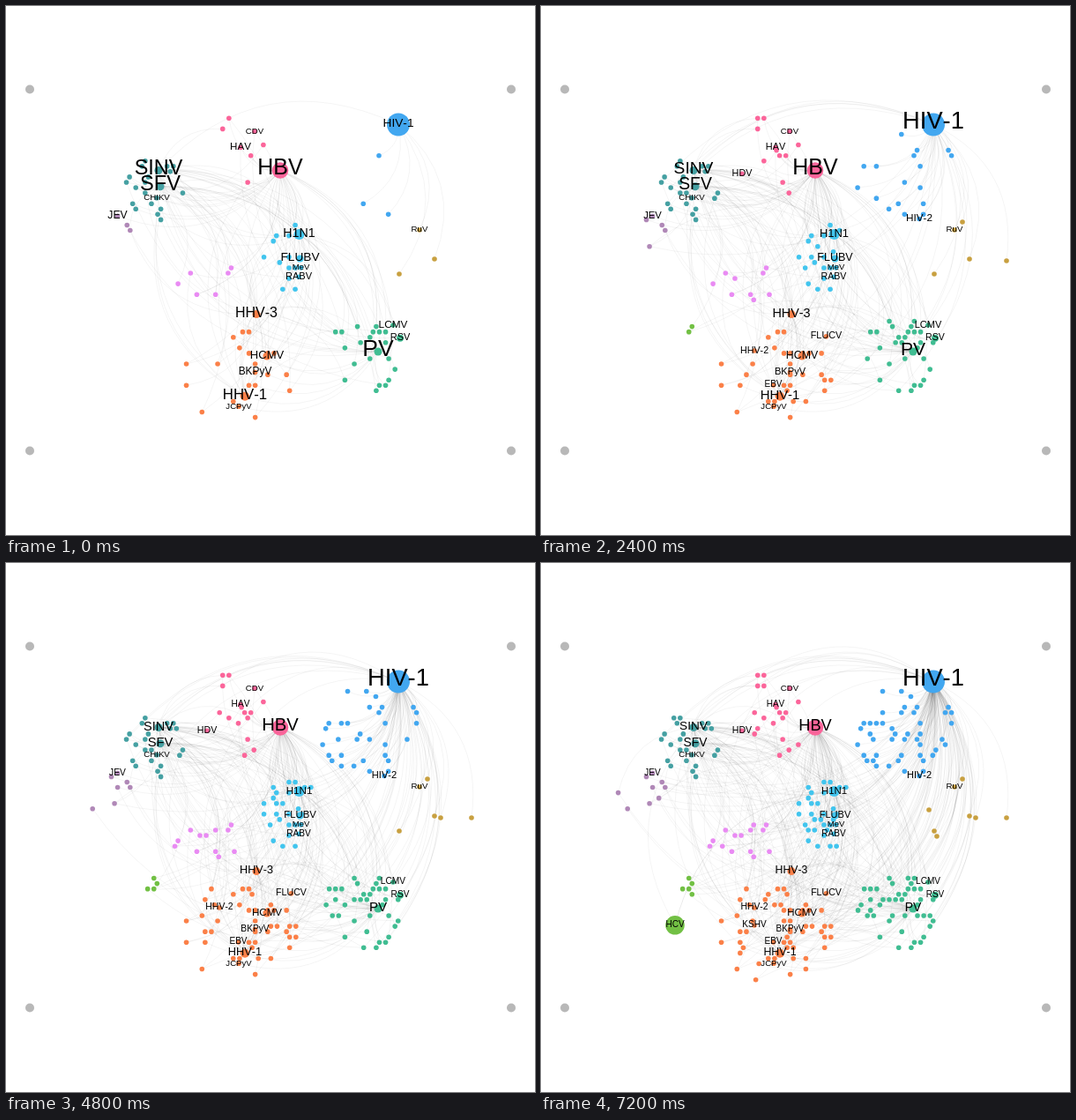
An HTML page with a canvas that plays this animation: 600x600 px, repeating every 8000 ms.

```html
<!DOCTYPE html>
<html lang="en">
<head>
<meta charset="utf-8">
<title>Virus network</title>
<style>
  html, body { margin: 0; width: 100%; height: 100%; overflow: hidden; background: #fff; }
  canvas { display: block; width: 600px; height: 600px; }
</style>
</head>
<body>
<canvas id="stage" width="600" height="600"></canvas>
<script>
const STEP = 800, STEPS = 10, LAST = STEPS - 1;
const ctx = document.getElementById('stage').getContext('2d');
const dots = [], labels = [], links = [];

const BLUE = '#42a7f0', PINK = '#fb659a', TEAL = '#45a0a2', PURPLE = '#b088b7',
      VIOLET = '#e98bf3', SKY = '#42c5ee', MINT = '#40bd92', ORANGE = '#fb8048',
      GOLD = '#c8a040', GREEN = '#72c044';

let seed = 41;
const rand = () => {
  seed = (seed * 1664525 + 1013904223) % 4294967296;
  return seed / 4294967296;
};
const pick = list => list[Math.floor(rand() * list.length)];

function dot(x, y, color, born = 0, r = 2.8) {
  const d = { x, y, color, born, r };
  dots.push(d);
  return d;
}

// Scatters dots over a hexagonal lattice inside an ellipse; the count grows steadily.
function cluster(color, cx, cy, rx, ry, first, last) {
  const dx = 7.1, dy = 6.06, free = [];
  for (let row = Math.ceil((cy - ry) / dy); row * dy <= cy + ry; row++) {
    const shift = row % 2 ? dx / 2 : 0;
    for (let x = cx - rx + shift; x <= cx + rx; x += dx) {
      const y = row * dy;
      if (((x - cx) / rx) ** 2 + ((y - cy) / ry) ** 2 <= 1) free.push([x, y]);
    }
  }
  for (let i = 0; i < last; i++) {
    const [[x, y]] = free.splice(Math.floor(rand() * free.length), 1);
    const born = i < first ? 0 : 1 + Math.floor((i - first) / (last - first) * LAST);
    dot(x, y, color, born);
  }
}

// A named dot; its label goes from one size to another.
function node(name, color, x, y, { from = 11, to = 10, hold = 2, born = 0, r } = {}) {
  labels.push({ name, x, y: y + 1, from, to, hold, born });
  return dot(x, y, color, born, r);
}

// Labels grow quickly over two steps, or hold and then shrink towards their final size.
function sizeAt({ from, to, hold }, step) {
  const rest = from < to ? Math.max(0, 1 - step / 2) : 0.58 ** Math.max(0, step - hold);
  return to + (from - to) * rest;
}

cluster(BLUE, 412, 190, 60, 50, 3, 45);
cluster(PINK, 266, 170, 38, 51, 5, 18);
cluster(TEAL, 167, 207, 34, 37, 18, 22);
cluster(PURPLE, 116, 262, 32, 23, 2, 8);
cluster(VIOLET, 230, 311, 42, 26, 6, 14);
cluster(SKY, 326, 286, 37, 40, 12, 30);
cluster(MINT, 408, 395, 52, 46, 20, 42);
cluster(ORANGE, 267, 417, 66, 60, 20, 52);
cluster(GREEN, 166, 371, 16, 15, 0, 5);
[[446, 304], [486, 287], [528, 289], [478, 245], [493, 289], [440, 280], [449, 310]]
  .forEach(([x, y], i) => dot(x, y, GOLD, Math.max(0, 2 * i - 3)));

const HIV = node('HIV-1', BLUE, 445, 134.5, { from: 13.7, to: 27.3, r: 13 });
const HBV = node('HBV', PINK, 311, 186.5, { from: 25, to: 17.8, hold: 4, r: 9.3 });
const SINV = node('SINV', TEAL, 173, 186.5, { from: 23.4, to: 13.4, r: 4.5 });
const SFV = node('SFV', TEAL, 175, 204.7, { from: 23.6, to: 13.6, r: 4.5 });
const PV = node('PV', MINT, 422, 392, { from: 26.5, to: 13.7, r: 4.5 });
const H1N1 = node('H1N1', SKY, 332.5, 259, { from: 14.2, to: 11.3, r: 6 });
const HHV1 = node('HHV-1', ORANGE, 271, 442.7, { from: 16.8, to: 12.3, r: 5 });
const HHV3 = node('HHV-3', ORANGE, 284, 349.6, { from: 16, to: 12.2, r: 4.5 });
const HCV = node('HCV', GREEN, 152, 410.8, { born: 7, r: 10.8 });
node('FLUBV', SKY, 333.5, 286.4, { from: 13.7, to: 11, r: 4 });
node('HCMV', ORANGE, 296, 397, { from: 13, to: 11.4, r: 4.5 });
node('BKPyV', ORANGE, 282.5, 415.6, { from: 11.9 });
node('JEV', PURPLE, 126.5, 238.2, { from: 12.2 });
node('LCMV', MINT, 439, 362, { from: 11.8 });
node('HAV', PINK, 266, 160.5, { from: 11.6 });
node('RABV', SKY, 332, 307.2);
node('RSV', MINT, 447, 376.7, { r: 4 });
node('CDV', PINK, 282, 142.2, { from: 9.6, to: 9.6 });
node('CHIKV', TEAL, 171, 217.7, { from: 9.7, to: 9.7 });
node('MeV', SKY, 334.5, 296.7, { from: 9.6, to: 9.6 });
node('RuV', GOLD, 469, 254, { from: 9.7, to: 9.7 });
node('JCPyV', ORANGE, 264, 454.3, { from: 9.6, to: 9.6 });
node('HIV-2', BLUE, 429, 241.5, { from: 12.3, to: 11, born: 2 });
node('HHV-2', ORANGE, 242, 391, { to: 10.4, born: 2 });
node('FLUCV', ORANGE, 323.5, 374.7, { to: 10.6, born: 2 });
node('EBV', ORANGE, 263.5, 430, { from: 10, born: 2 });
node('HDV', PINK, 228, 190.3, { to: 10.6, born: 3 });
node('KSHV', ORANGE, 242, 411, { born: 9 });

function link(a, b, born = 0) {
  links.push({ a, b, born: Math.max(born, a.born, b.born) });
}

// Each dot is tied to a weighted choice of hubs.
const HUBS = [HBV, HBV, HBV, SINV, SINV, SFV, PV, PV, H1N1, HHV1, HHV3];
for (const d of dots) {
  if (d === HIV) continue;
  if (d.color === GOLD || d.color === BLUE) {
    link(HIV, d);
    continue;
  }
  for (let n = rand() < 0.5 ? 2 : 1; n > 0; n--) {
    const hub = pick(HUBS);
    if (rand() < 0.25) link(d, hub);
    else link(hub, d);
  }
  const later = 2 + Math.floor(rand() * 8);
  if (d.y > 240 && rand() < 0.6) link(HIV, d, later);
  if (d.y < 240 && rand() < 0.15) link(d, HIV, later);
}
link(SINV, HIV);
link(HCV, SINV);

function disc(x, y, r, color) {
  ctx.fillStyle = color;
  ctx.beginPath();
  ctx.arc(x, y, r, 0, Math.PI * 2);
  ctx.fill();
}

// Curves bow to the left of their direction.
function curve({ a, b }) {
  const dx = b.x - a.x, dy = b.y - a.y, bow = 0.36;
  ctx.beginPath();
  ctx.moveTo(a.x, a.y);
  ctx.quadraticCurveTo((a.x + b.x) / 2 + dy * bow, (a.y + b.y) / 2 - dx * bow, b.x, b.y);
  ctx.stroke();
}

function draw(step) {
  const present = item => item.born <= step;
  ctx.fillStyle = '#fff';
  ctx.fillRect(0, 0, 600, 600);

  ctx.strokeStyle = 'rgba(0, 0, 0, 0.08)';
  ctx.lineWidth = 0.6;
  links.filter(present).forEach(curve);

  for (const d of dots.filter(present)) disc(d.x, d.y, d.r, d.color);
  for (const x of [27, 573]) for (const y of [94.5, 504.5]) disc(x, y, 5, '#b8b8b8');

  ctx.fillStyle = '#000';
  ctx.textAlign = 'center';
  ctx.fontKerning = 'none';
  for (const l of labels.filter(present)) {
    const size = sizeAt(l, step);
    ctx.font = `${size}px "Liberation Sans", Arial, sans-serif`;
    ctx.fillText(l.name, l.x, l.y + size * 0.14);
  }
}

let shown = -1;
const start = performance.now();
function tick() {
  const step = Math.floor((performance.now() - start) / STEP) % STEPS;
  if (step !== shown) draw(shown = step);
  requestAnimationFrame(tick);
}
tick();
</script>
</body>
</html>
```
